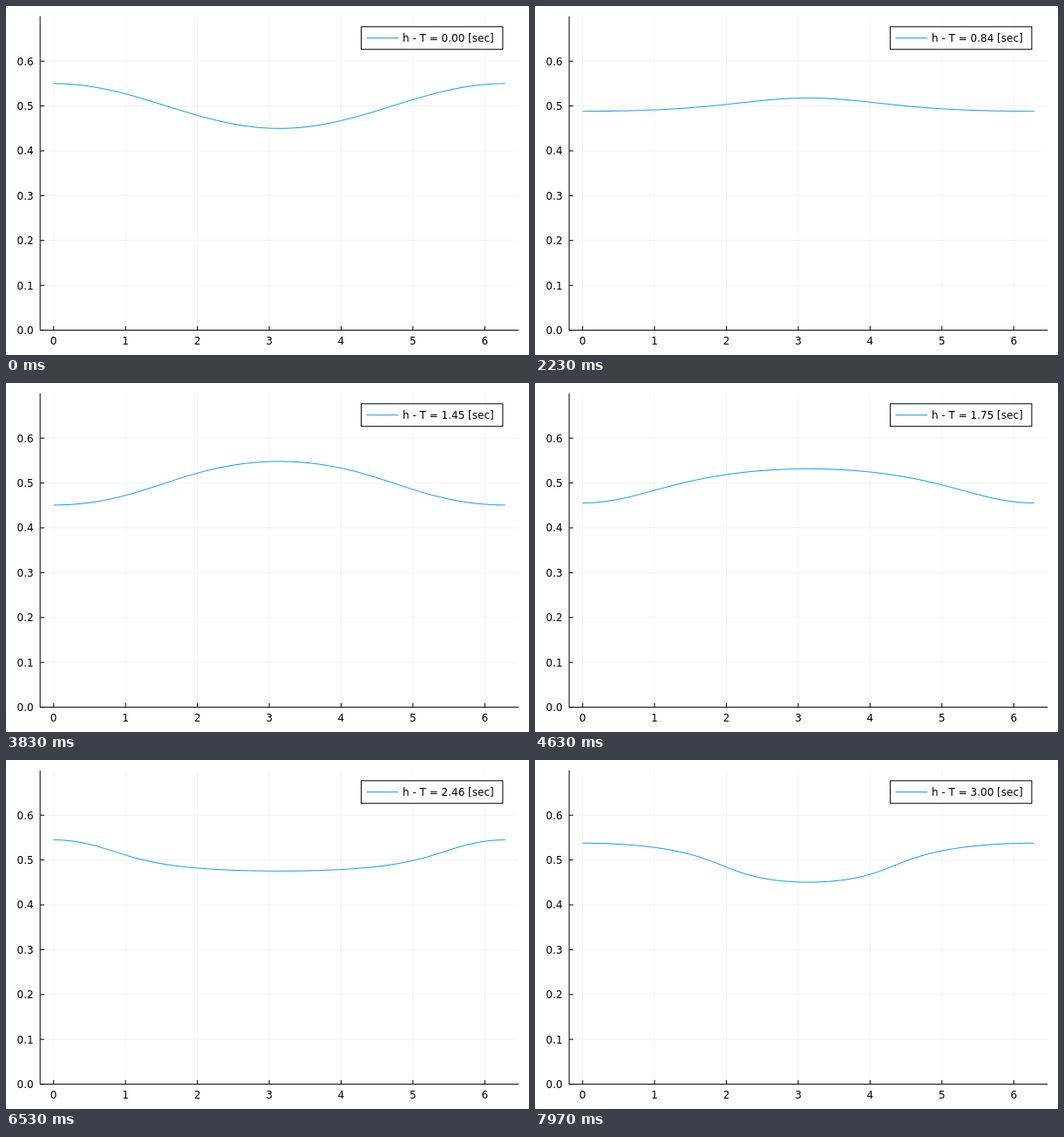
Write an HTML page that moves like this. It is 600x400 px and loops after 8000 ms.

```html
<!DOCTYPE html>
<html lang="en">
<head>
<meta charset="utf-8">
<title>Shallow water wave</title>
<style>
  html, body { margin: 0; width: 100%; height: 100%; overflow: hidden; background: #fff; }
  svg { display: block; width: 600px; height: 400px; }
  text { font: 12px "DejaVu Sans", sans-serif; fill: #000; white-space: pre; }
  .grid { stroke: #000; stroke-opacity: .1; stroke-width: .5; }
  .axis { stroke: #000; fill: none; }
  .wave { stroke: #009afa; fill: none; stroke-linejoin: round; }
</style>
</head>
<body>
<svg id="plot" viewBox="0 0 600 400"></svg>
<script>
const TAU = 2 * Math.PI;
const LOOP = 8000, FRAMES = 240, DT = TAU / 500;
const N = 256, DX = TAU / N, GRAVITY = 9.8;
const LEFT = 39.15, RIGHT = 588.19, TOP = 11.81, BOTTOM = 371.61;

const plot = document.getElementById("plot");
const px = x => LEFT + (RIGHT - LEFT) * (x / TAU + 0.03) / 1.06;
const py = h => BOTTOM - (BOTTOM - TOP) * h / 0.7;

function add(tag, attrs, text = "") {
  const el = document.createElementNS("http://www.w3.org/2000/svg", tag);
  for (const key in attrs) el.setAttribute(key, attrs[key]);
  el.textContent = text;
  return plot.appendChild(el);
}
const line = (cls, d) => add("path", { class: cls, d });
const label = (x, y, anchor, text) => add("text", { x, y, "text-anchor": anchor }, text);

function drawAxes() {
  for (let i = 0; i <= 6; i++) {
    const x = px(i), y = py(i / 10);
    line("grid", `M${x} ${BOTTOM}V${TOP}`);
    line("grid", `M${LEFT} ${y}H${RIGHT}`);
    line("axis", `M${x} ${BOTTOM}v-4.72`);
    line("axis", `M${LEFT} ${y}h4.72`);
    label(x, 387.6, "middle", i);
    label(31.6, y + 4.32, "end", (i / 10).toFixed(1));
  }
  line("axis", `M${LEFT} ${TOP}V${BOTTOM}H${RIGHT}`);
}

// Shallow water equations on a periodic grid; state is [depth, velocity].
function slope(f) {
  const at = i => f[(i + N) % N];
  return f.map((_, i) => (8 * (at(i + 1) - at(i - 1)) - at(i + 2) + at(i - 2)) / (12 * DX));
}
function rate([h, u]) {
  const flux = slope(h.map((v, i) => v * u[i]));
  const head = slope(h.map((v, i) => GRAVITY * v + u[i] * u[i] / 2));
  return [flux.map(v => -v), head.map(v => -v)];
}
const shift = (s, k, dt) => s.map((f, j) => f.map((v, i) => v + dt * k[j][i]));

function step(s) {
  const a = rate(s);
  const b = rate(shift(s, a, DT / 2));
  const c = rate(shift(s, b, DT / 2));
  const d = rate(shift(s, c, DT));
  return s.map((f, j) => f.map((v, i) =>
    v + DT / 6 * (a[j][i] + 2 * b[j][i] + 2 * c[j][i] + d[j][i])));
}

function wavePath(h) {
  let d = "";
  for (let i = 0; i <= N; i++) {
    d += (i ? "L" : "M") + px(i * DX).toFixed(2) + " " + py(h[i % N]).toFixed(2);
  }
  return d;
}

const paths = [];
let state = [
  Array.from({ length: N }, (_, i) => 0.5 + 0.05 * Math.cos(i * DX)),
  new Array(N).fill(0)
];
for (let k = 0; k < FRAMES; k++) {
  paths.push(wavePath(state[0]));
  state = step(state);
}

drawAxes();
const wave = line("wave", paths[0]);
add("rect", { class: "axis", x: 407.6, y: 23.8, width: 162.3, height: 25.92, style: "fill:#fff" });
line("wave", "M413.7 36.77h36.6");
const legend = label(455, 41.1, "start", "");

const start = performance.now();
function draw() {
  const ticks = Math.floor((performance.now() - start) % LOOP / 10);
  const k = Math.floor((3 * ticks + 1) / 10);  // 30 steps a second on a 10 ms clock
  wave.setAttribute("d", paths[k]);
  legend.textContent = `h - T = ${(k * DT).toFixed(2)} [sec]`;
  requestAnimationFrame(draw);
}
draw();
</script>
</body>
</html>
```
